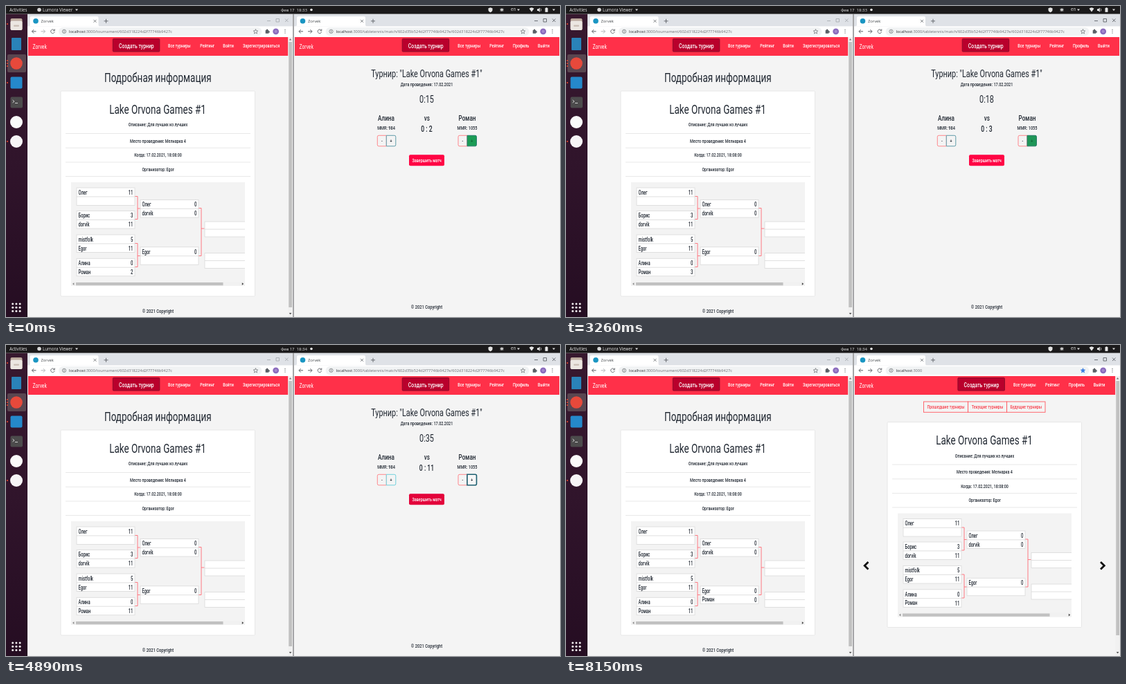
Write an HTML page that moves like this. It is 800 by 450 pixels and loops after 9.78 s.

```html
<!DOCTYPE html>
<html lang="ru">
<head>
<meta charset="utf-8">
<title>Турнир</title>
<style>
  html, body { margin: 0; width: 100%; height: 100%; overflow: hidden; background: #f4f4f4; }
  svg { display: block; width: 800px; height: 450px; }
  .page { font-family: Roboto, "Open Sans", "Noto Sans", sans-serif; }
  .ui { font-family: "Open Sans", "Noto Sans", sans-serif; }
  text { white-space: pre; }
</style>
</head>
<body>
<svg id="stage" viewBox="0 0 800 450" xmlns="http://www.w3.org/2000/svg"></svg>
<script>
const STEP_MS = 1630;
const NARROW = 0.71; // the pages use one condensed face
const INK = '#212832', RED = '#ff3049', LINE = '#ff6c77', EDGE = '#d9d9d9';
const SITE = 'Zorvek', CUP = 'Lake Orvona Games #1';
const HOST = 'Egor', ANNA = 'Алина', ROMAN = 'Роман';

const steps = [
  { clock: '18:33', time: '0:15', score: 2, plus: '#1b9c55', rim: '#2c7d70' },
  { clock: '18:33', time: '0:17', score: 3, plus: '#1db05c', rim: '#2b8768', flashScore: true },
  { clock: '18:33', time: '0:18', score: 3, plus: '#1e9657', rim: '#2b7a68' },
  { clock: '18:34', time: '0:35', score: 11, plus: '#f7f7f7', rim: '#1c5f70', hover: true },
  { clock: '18:34', score: 11, home: true, advanced: true, flashNext: true },
  { clock: '18:34', score: 11, home: true, advanced: true }
];

const rect = (x, y, w, h, fill, extra = '') =>
  `<rect x="${x}" y="${y}" width="${w}" height="${h}" fill="${fill}" ${extra}/>`;
const circle = (x, y, r, fill, extra = '') =>
  `<circle cx="${x}" cy="${y}" r="${r}" fill="${fill}" ${extra}/>`;
const path = (d, stroke, width = 1, extra = '') =>
  `<path d="${d}" fill="none" stroke="${stroke}" stroke-width="${width}" ${extra}/>`;
const shape = (d, fill) => `<path d="${d}" fill="${fill}"/>`;
const move = (x, y, body) => `<g transform="translate(${x} ${y})">${body}</g>`;

// y is the middle of the capitals
function type(x, y, str, size, { anchor = 'middle', fill = INK, weight = 500 } = {}) {
  return `<text class="page" transform="translate(${x} ${y + size * 0.355}) scale(${NARROW} 1)" font-size="${size}"` +
    ` font-weight="${weight}" text-anchor="${anchor}" fill="${fill}">${str}</text>`;
}
const ui = (x, y, str, size, fill, extra = '') =>
  `<text class="ui" x="${x}" y="${y + size * 0.36}" font-size="${size}" fill="${fill}" ${extra}>${str}</text>`;
const caret = (x, y, fill) => shape(`M${x - 2} ${y - 1}h4l-2 2.6z`, fill);

function topBar(clock) {
  const light = '#e6e6e6';
  return rect(0, 0, 800, 11.5, '#1b1a1b') +
    ui(5, 5.5, 'Activities', 6.2, light) +
    circle(48, 5.5, 2.8, '#d8d8d8') +
    ui(53, 5.5, 'Lumora Viewer', 6.2, light) + caret(102, 5.5, light) +
    ui(397, 5.5, 'фев 17  ' + clock, 6, light) + circle(441, 5.5, 1.7, '#fff') +
    shape('M696.5 3.2l3-1 3 1v2.4q0 2.6-3 3.6q-3-1-3-3.6z', light) +
    path('M713.5 5.5h5M716 3v5M714 3.5l4 4M718 3.5l-4 4', light, 1) +
    ui(729, 5.2, 'en', 6.2, light) + caret(740, 5.5, light) +
    shape('M755.5 3.8q3.5-3 7 0l-3.5 4.7z', light) +
    shape('M767 4.2h1.8l2-1.8v6.4l-2-1.8H767z', light) + path('M772 3.6q1.6 2 0 4', light, .8) +
    rect(778.5, 3, 4, 5.8, light) + rect(779.6, 2.2, 1.8, 1, light) + caret(791, 5.5, light);
}

function dock() {
  let s = rect(0, 11.5, 31, 439, 'url(#dock)') + rect(2, 70, 27, 26, '#594650', 'rx="2"');
  for (const y of [26, 83, 111, 196]) s += circle(2, y, 1.1, '#e0482e');
  s += circle(2, 79, 1.1, '#e0482e') + circle(2, 87, 1.1, '#e0482e');
  s += rect(6.5, 18, 17, 17, '#bba99c', 'rx="2"') + rect(6.5, 21.5, 17, 13.5, '#ece7e2', 'rx="2"') +
    rect(11, 27.5, 8, 2.2, '#c9bdb4', 'rx="1"');
  s += rect(8, 46, 14, 18, '#2a83b9', 'rx="1"');
  s += circle(15, 83, 8.8, '#e7493b');
  s += rect(6.5, 102.5, 17, 17, '#2589cb', 'rx="2"');
  s += rect(6.5, 131.5, 17.5, 16, '#4c4b4c', 'rx="2"') +
    path('M9.5 136l2.5 2-2.5 2M13 140.5h4', '#ddd', .9);
  s += circle(15, 168, 9, '#fafafa') + circle(15, 196, 9, '#f6f4f6');
  for (let i = 0; i < 9; i++) s += circle(9.7 + i % 3 * 5.2, 431 + Math.floor(i / 3) * 5.2, 1.5, '#f2eef1');
  return s;
}

// Browser frame; x is the left edge, w the width
function browser(x, w, url, active, home) {
  const grey = '#5f6368', faint = active ? '#50545a' : '#a3a7ad', r = x + w;
  const fwd = active ? grey : '#b5b8bc';
  const slash = url.indexOf('/');
  const host = slash < 0 ? url : url.slice(0, slash);
  const [name, port] = host.split(':');
  const starFill = home ? '#3b7de0' : 'none';
  return rect(x, 11.5, w, 438.5, '#f4f4f4') + rect(x, 11.5, w, 18, '#dfe2e7') +
    shape(`M${x + 2} 29.5q2 0 2-3V17q0-2 2-2h95q2 0 2 2v9.5q0 3 2 3z`, '#fff') +
    circle(x + 12.5, 21.8, 3.8, '#1995c2') + ui(x + 20, 21.8, SITE, 5.8, '#45494d') +
    path(`M${x + 96} 19.8l4 4m0-4l-4 4`, grey, .8) +
    path(`M${x + 111} 21.8h6m-3-3v6`, grey, .9) +
    path(`M${r - 37} 21.5h5`, faint, .8) +
    path(`M${r - 24} 18.5h4.5v4.5h-4.5z`, faint, .8) +
    path(`M${r - 11} 18.5l4.5 4.5m0-4.5l-4.5 4.5`, faint, .8) +
    rect(x, 29.5, w, 15.5, '#fff') +
    path(`M${x + 13} 36.8h-6m2.7-2.7l-2.7 2.7 2.7 2.7`, grey, 1) +
    path(`M${x + 20} 36.8h6m-2.7-2.7l2.7 2.7-2.7 2.7`, fwd, 1) +
    path(`M${x + 39.3} 35.2a2.8 2.8 0 1 0 .4 2.2M${x + 39.8} 33.4v2.4h-2.4`, grey, .9) +
    rect(x + 45.5, 31, r - x - 90, 12, '#f1f3f4', 'rx="6"') +
    circle(x + 53.5, 36.8, 2.6, 'none', `stroke="${grey}" stroke-width=".7"`) +
    rect(x + 53.1, 36.3, .8, 1.9, grey) + rect(x + 53.1, 35.1, .8, .7, grey) +
    ui(x + 60.5, 36.8, `<tspan fill="#25282c">${name}</tspan>:${port}${slash < 0 ? '' : url.slice(slash)}`, 5.6, '#6b6f74') +
    move(r - 53.5, 36.8, `<path d="M0-3.2l.9 2.2 2.3.2-1.8 1.6.6 2.3-2-1.2-2 1.2.6-2.3-1.8-1.6 2.3-.2z" fill="${starFill}" stroke="${home ? starFill : grey}" stroke-width=".7"/>`) +
    move(r - 36.5, 36.8, rect(-2.8, -1.8, 4.7, 4.8, '#5b6066', 'rx=".6"') + circle(-.4, -2.2, 1.2, '#5b6066') + circle(2.2, .6, 1.2, '#5b6066')) +
    circle(r - 24.3, 36.8, 4.4, '#8a6bbd') + circle(r - 24.3, 36.8, 2, '#a48bcc') +
    [-2.3, 0, 2.3].map(d => circle(r - 11, 36.8 + d, .65, grey)).join('');
}

function scrollbar(x, bottom) {
  return rect(x, 45, 6.5, 405, '#f1f1f1') + rect(x + 1, 52, 4.8, bottom - 52, '#c1c1c1') +
    shape(`M${x + 1.5} 49.5h3.6l-1.8-2.4z`, '#777') + shape(`M${x + 1.5} 444h3.6l-1.8 2.4z`, '#555');
}

function navbar(x, w, buttonX, links) {
  return rect(x, 45, w, 27, RED) +
    type(x + 6.5, 59, SITE, 9.5, { anchor: 'start', fill: '#fff', weight: 400 }) +
    rect(buttonX, 47.5, 67.5, 18.5, '#b9002c', 'stroke="#8c0c2b" stroke-width="1" rx="1"') +
    type(buttonX + 34, 57.3, 'Создать турнир', 9.6, { fill: '#fff' }) +
    links.map(([lx, s]) => type(lx, 57.3, s, 7.7, { anchor: 'start', fill: '#fff' })).join('');
}

// Two player rows; each row is [name, points, highlight]
function pair(x, y, rows) {
  let s = rect(x, y, 84, 25.5, '#fff', `stroke="${EDGE}" stroke-width=".8"`);
  rows.forEach(([name, points, tint], i) => {
    const top = y + i * 12.9;
    if (tint) s += rect(x, top, 84, 12.9, tint);
    if (!name) return;
    const fill = tint ? '#6b1725' : INK;
    s += type(x + 2.5, top + 6.8, name, 8.2, { anchor: 'start', fill }) +
      type(x + 81.5, top + 6.8, points, 8.5, { anchor: 'end', fill });
  });
  return s + path(`M${x} ${y + 12.9}h84`, EDGE, .8);
}

const joint = (x, top, bottom, mid) =>
  path(`M${x} ${top}h4V${bottom}h-4M${x + 4} ${mid}h4.5`, LINE, .9);

function card(st, score, advanced) {
  const soft = st.flashNext && advanced ? '#ff6674' : '';
  const hot = st.flashScore ? '#ff3448' : '';
  const none = ['', ''];
  const facts = [[171.5, 'Описание: Для лучших из лучших'], [195.3, 'Место проведения: Мелнарка 4'],
    [215.5, 'Когда: 17.02.2021, 18:08:00'], [236, 'Организатор: ' + HOST]];
  return rect(79, 123, 280.5, 297, '#fff', 'stroke="#e3e3e3" stroke-width=".8" rx="1"') +
    type(219, 149, CUP, 19, { weight: 400 }) +
    facts.map(([y, s]) => type(219.5, y, s, 7.6)).join('') +
    [184.5, 205.3, 226, 246.5].map(y => path(`M86 ${y}h267`, '#e2e2e2', .8)).join('') +
    rect(94, 255, 251, 150, '#f3f3f3') +
    '<g clip-path="url(#panel)">' +
    joint(186, 275.5, 308.5, 293) + joint(186, 343.5, 377.5, 361.5) + joint(278, 292.5, 361.5, 322) +
    pair(102, 263, [['Олег', 11], none]) +
    pair(102, 296.5, [['Борис', 3], ['dorvik', 11]]) +
    pair(102, 331, [['mistfolk', 5], [HOST, 11]]) +
    pair(102, 365.3, [[ANNA, 0], [ROMAN, score, hot]]) +
    pair(194, 280.5, [['Олег', 0], ['dorvik', 0]]) +
    pair(194, 348.8, [[HOST, 0, soft], advanced ? [ROMAN, 0, soft] : none]) +
    [312, 357.5].map(y => rect(287, y, 84, 22, '#fff', `stroke="${EDGE}" stroke-width=".8"`) +
      path(`M287 ${y + 11}h84`, EDGE, .8)).join('') + '</g>' +
    rect(94, 399, 251, 6, '#f1f1f1') + rect(101, 400, 212.5, 4.3, '#c1c1c1') +
    shape('M98.4 400.3v3.6l-2.4-1.8z', '#888') + shape('M340.8 400.3v3.6l2.4-1.8z', '#444');
}

function stepper(x, plus, rim, ink, thick = 1) {
  return path(`M${x + 13} 187.3h-11q-2 0-2 2v11.5q0 2 2 2h11z`, '#ff7c82', .9) +
    `<path d="M${x + 13} 187.3h11.5q2 0 2 2v11.5q0 2-2 2h-11.5z" fill="${plus}" stroke="${rim}" stroke-width="${thick}"/>` +
    type(x + 6.5, 195, '-', 7.6) + type(x + 19.7, 195, '+', 7.6, { fill: ink });
}

function match(st) {
  return type(607.5, 97.3, `Турнир: "${CUP}"`, 15.3, { weight: 400 }) +
    type(607.5, 113, 'Дата проведения: 17.02.2021', 7.7) +
    type(607.5, 134.2, st.time, 15.3, { weight: 400 }) +
    type(549, 161.5, ANNA, 11.4) + type(607.8, 161.5, 'vs', 11.4) + type(666, 161.5, ROMAN, 11.4) +
    type(549, 175.7, 'MMR: 984', 7.9) + type(666, 175.7, 'MMR: 1055', 7.9) +
    type(607.5, 177.3, '0 : ' + st.score, 12.2) +
    stepper(536.3, '#f4f4f4', st.hover ? '#6fd0dc' : '#5f9aa8', INK) +
    stepper(653, st.plus, st.rim, st.hover ? INK : '#145c38', st.hover ? 1.6 : 1) +
    rect(582, 215.3, 51, 16, st.hover ? '#e3033b' : '#ff0544', 'rx="2"') +
    type(607.7, 223.5, 'Завершить матч', 7.6, { fill: '#fff' }) +
    type(607.5, 435.3, '© 2021 Copyright', 8.1);
}

function home(st) {
  const tabs = [[516.5, 64, 'Прошедшие турниры'], [580.5, 56, 'Текущие турниры'], [636.5, 55.5, 'Будущие турниры']];
  return tabs.map(([x, w, s]) => rect(x, 82, w, 15.3, 'none', 'stroke="#ff5a62" stroke-width=".9"') +
      type(x + w / 2, 89.8, s, 7.6, { fill: '#f8414e' })).join('') +
    move(385, -11.5, card(st, 11, false)) +
    path('M436.5 314l-5.3 5.2 5.3 5.2', '#111', 2.8) +
    path('M772 314l5.3 5.2-5.3 5.2', '#111', 2.8) +
    scrollbar(793.3, 420);
}

function scene(st) {
  const shift = st.home ? -6.3 : 0;
  const rightLinks = [[652.3, 'Все турниры'], [698.3, 'Рейтинг'], [732, 'Профиль'], [768, 'Выйти']]
    .map(([x, s]) => [x + shift, s]);
  const id = '602d318224d2f77746b9427c';
  const rightUrl = 'localhost:3000' + (st.home ? '' : '/tabletennis/match/602d35b524d2f77746b9427e/' + id);
  return '<defs><linearGradient id="dock" x2="0" y2="1"><stop stop-color="#38192f"/><stop offset=".5" stop-color="#30142b"/>' +
    '<stop offset="1" stop-color="#250d22"/></linearGradient><clipPath id="panel"><rect x="94" y="255" width="251" height="144"/></clipPath></defs>' +
    browser(30.5, 383.5, 'localhost:3000/tournament/' + id, false, false) +
    navbar(32, 375.5, 154.3, [[234, 'Все турниры'], [280.3, 'Рейтинг'], [313.3, 'Войти'], [342, 'Зарегистрироваться']]) +
    type(219.3, 103.5, 'Подробная информация', 19, { weight: 400 }) +
    card(st, st.score, st.advanced) +
    type(219.5, 441, '© 2021 Copyright', 8.1) + scrollbar(407.3, 436) +
    browser(416, 384, rightUrl, true, st.home) +
    navbar(417, st.home ? 376.3 : 382, 572.2 + shift, rightLinks) +
    (st.home ? home(st) : match(st)) +
    rect(414, 11.5, 2, 438.5, '#a5a5a7') + dock() + topBar(st.clock);
}

const stage = document.getElementById('stage');
const scenes = steps.map(scene);
const start = performance.now();
let shown = -1;

function tick(now) {
  const index = Math.floor(Math.max(0, now - start) / STEP_MS) % steps.length;
  if (index !== shown) stage.innerHTML = scenes[shown = index];
  requestAnimationFrame(tick);
}
tick(start);
</script>
</body>
</html>
```
